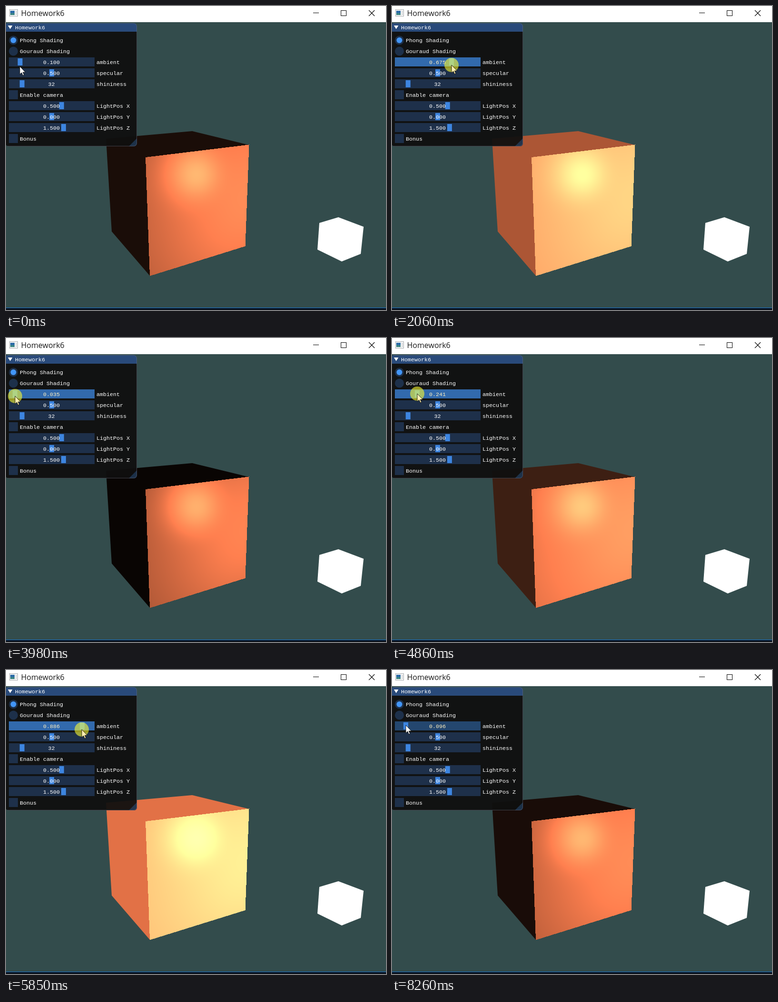
Animation of 798 by 639 pixels, one loop 9.11 s. Source, as an HTML page with a canvas:

```html
<!DOCTYPE html>
<html lang="en">
<head>
<meta charset="utf-8">
<title>Homework6</title>
<style>
  html, body { margin: 0; width: 100%; height: 100%; overflow: hidden; background: #334c4c; }
  canvas, svg { position: absolute; left: 0; top: 0; width: 798px; height: 639px; display: block; }
  .ui { font: 11.667px "Liberation Mono", monospace; fill: #fff; white-space: pre; }
  .title { font: 16px "Open Sans", sans-serif; fill: #1a1a1a; }
</style>
</head>
<body>
<canvas id="scene" width="798" height="639"></canvas>
<svg viewBox="0 0 798 639" width="798" height="639">
  <rect width="798" height="34" fill="#fff"/>
  <g shape-rendering="crispEdges">
    <rect x="7.5" y="7.5" width="17" height="14" fill="#f6f6f6" stroke="#a9adb0"/>
    <rect x="9" y="10" width="9" height="9" fill="#2d6ca8"/>
    <rect x="9" y="15" width="9" height="4" fill="#3c8583"/>
    <path d="M20 11.5h3M20 14.5h3M20 17.5h3" stroke="#b4b8bc"/>
  </g>
  <text class="title" x="31.5" y="21">Homework6</text>
  <g fill="none" stroke="#000">
    <path d="M645 14.5h12M703.5 9.5h11v11h-11z" shape-rendering="crispEdges"/>
    <path d="M762 9l12 12M774 9l-12 12" stroke-width="1.2"/>
  </g>
  <rect y="634" width="798" height="5" fill="#0b1420"/>
  <rect y="634" width="798" height="1" fill="#1a78d0"/>

  <path d="M0 54H275V289a6 6 0 0 1-6 6H5a6 6 0 0 1-5-3z" fill="#0f0f0f" fill-opacity=".94"/>
  <path d="M0 38q1-2 5-2H268a7 7 0 0 1 7 7V54H0z" fill="#294a7a"/>
  <path d="M258 295L275 278V289a6 6 0 0 1-6 6z" fill="#4296fa" fill-opacity=".25"/>
  <path d="M3 36.5H268a6.5 6.5 0 0 1 6.5 6.5V288a6.5 6.5 0 0 1-6.5 6.5H3" fill="none" stroke="#6e6e80" stroke-opacity=".5"/>
  <path d="M4 41h9.5l-4.75 7.5z" fill="#fff"/>
  <g id="panel" class="ui"><text x="19" y="49">Homework6</text></g>

  <circle id="press" r="15" fill="#ffff30" fill-opacity=".58"/>
  <path id="cursor" d="M0 0V16.5L3.8 13 6.4 19 8.9 18 6.4 12.2H11.6z" stroke="#000" stroke-width=".8"/>
</svg>
<script>
const LOOP = 9110, PRESS = 440, RELEASE = 8260, HOVER = 150;
const $ = id => document.getElementById(id);

// ---- settings panel ----
function add(tag, attrs, text) {
  const el = document.createElementNS('http://www.w3.org/2000/svg', tag);
  for (const k in attrs) el.setAttribute(k, attrs[k]);
  if (text) el.textContent = text;
  return $('panel').appendChild(el);
}
const FRAME = { fill: '#294a7a', 'fill-opacity': .54 };
const label = (x, row, text) => add('text', { x, y: row + 4 }, text);
const grabX = v => 13 + 166 * v;

function radio(row, text, on) {
  add('circle', { cx: 15.5, cy: row, r: 9.5, ...FRAME });
  if (on) add('circle', { cx: 15.5, cy: row, r: 6, fill: '#4296fa' });
  label(29, row, text);
}
function checkbox(row, text) {
  add('rect', { x: 6, y: row - 10, width: 19, height: 19, ...FRAME });
  label(29, row, text);
}
function slider(row, text, value, pos) {
  const bar = add('rect', { x: 6, y: row - 10, width: 180, height: 19, ...FRAME });
  const grab = add('rect', { x: grabX(pos) - 5, y: row - 8, width: 10, height: 15, fill: '#3d85e0' });
  const num = label(95.5, row, value);
  num.setAttribute('text-anchor', 'middle');
  label(190, row, text);
  return { bar, grab, num };
}

radio(72, 'Phong Shading', true);
radio(95, 'Gouraud Shading');
const ambient = slider(118, 'ambient', '0.100', .1);
slider(141, 'specular', '0.500', .5);
slider(164, 'shininess', '32', .125);
checkbox(187, 'Enable camera');
slider(210, 'LightPos X', '0.500', .625);
slider(233, 'LightPos Y', '0.000', .5);
slider(256, 'LightPos Z', '1.500', .65);
checkbox(279, 'Bonus');

// ---- Phong-lit cube ----
const ctx = $('scene').getContext('2d');
const BOX = { x: 292, y: 291, w: 220, h: 278 };
const CUBE = [[210, 279], [391, 263], [510, 292], [502, 505], [302, 567], [222, 474]];
const LAMP = [[698, 444], [751, 464], [745, 521], [705, 537], [654, 512], [658, 456]];
const light = [.5, 0, 1.5], eye = [-1.38, 1.02, 2.78];
const unit = v => { const n = Math.hypot(...v); return v.map(c => c / n); };
const toward = (p, q) => unit(q.map((c, i) => c - p[i]));

// Diffuse plus specular light at a point of the front face.
function lit(x, y) {
  const p = [x, y, .5], l = toward(p, light), v = toward(p, eye);
  const spec = Math.max(0, -l[0] * v[0] - l[1] * v[1] + l[2] * v[2]);
  return l[2] + .5 * spec ** 32;
}

// Perspective mapping from the unit square to the face on screen, inverted per pixel.
function faceLight() {
  const [x0, y0, x1, y1, x2, y2, x3, y3] = [293, 318, 510.5, 291.5, 502.5, 505, 302, 567.5];
  const ax = x1 - x2, ay = y1 - y2, bx = x3 - x2, by = y3 - y2;
  const sx = x0 - x1 + x2 - x3, sy = y0 - y1 + y2 - y3, den = ax * by - bx * ay;
  const g = (sx * by - bx * sy) / den, h = (ax * sy - sx * ay) / den;
  const a = x1 - x0 + g * x1, b = x3 - x0 + h * x3;
  const d = y1 - y0 + g * y1, e = y3 - y0 + h * y3;
  const out = new Float32Array(BOX.w * BOX.h);
  for (let i = 0; i < out.length; i++) {
    const X = BOX.x + i % BOX.w + .5, Y = BOX.y + Math.floor(i / BOX.w) + .5;
    const m = a - g * X, n = b - h * X, o = d - g * Y, q = e - h * Y;
    const det = m * q - n * o;
    const u = ((X - x0) * q - n * (Y - y0)) / det, v = (m * (Y - y0) - o * (X - x0)) / det;
    out[i] = u >= 0 && u <= 1 && v >= 0 && v <= 1 ? lit(u - .5, .5 - v) : -1;
  }
  return out;
}
const glow = faceLight(), image = ctx.createImageData(BOX.w, BOX.h);

function polygon(points, fill) {
  ctx.fillStyle = fill;
  ctx.beginPath();
  points.forEach(p => ctx.lineTo(...p));
  ctx.fill();
}
function drawScene(amb) {
  ctx.clearRect(0, 0, 798, 639);
  const px = image.data;
  glow.forEach((s, i) => {
    if (s < 0) return;
    const k = 255 * (s + amb), j = 4 * i;
    px[j] = k; px[j + 1] = k * .5; px[j + 2] = k * .31; px[j + 3] = 255;
  });
  ctx.putImageData(image, BOX.x, BOX.y);
  ctx.globalCompositeOperation = 'destination-over';
  polygon(CUBE, `rgb(${255 * amb},${127.5 * amb},${79 * amb})`);
  polygon(LAMP, '#fff');
  ctx.globalCompositeOperation = 'source-over';
}

// ---- pointer motion: bursts of steps, keys are [step, x, y, grab x if it lags] ----
const START = [0, 29, 127, 29.6];
const BURSTS = [
  { at: 70, gap: 80, keys: [[3, 29, 119, 29.6]] },
  { at: 830, gap: 77.3, keys: [[3, 38, 115], [8, 69, 121], [12, 125, 124]] },
  { at: 2670, gap: 76.7, keys: [[6, 113, 124], [10, 53, 122]] },
  { at: 3510, gap: 72, keys: [[8, 14, 122], [11, 17, 122]] },
  { at: 4610, gap: 79, keys: [[4, 53, 117], [9, 142, 126], [12, 176, 126]] },
  { at: 5540, gap: 80, keys: [[1, 177, 126]] },
  { at: 5850, gap: 78, keys: [[8, 35, 115, 41], [10, 18, 115], [11, 29, 116]] }
];
function pointer(t) {
  let pos = START;
  for (const { at, gap, keys } of BURSTS) {
    if (t < at) break;
    const step = Math.floor((t - at + 12) / gap) + 1;
    let from = [0, ...pos.slice(1)];
    for (const key of keys) {
      const to = [key[0], key[1], key[2], key[3] ?? key[1]];
      const f = Math.min(1, (step - from[0]) / (to[0] - from[0]));
      pos = from.map((c, i) => c + (to[i] - c) * f);
      if (step <= to[0]) break;
      from = to;
    }
  }
  return { x: pos[1], y: pos[2], value: Math.min(1, Math.max(0, (pos[3] - 13) / 166)) };
}

let shown = -1;
function render(t) {
  const { x, y, value } = pointer(t);
  const down = t >= PRESS && t < RELEASE, over = t >= HOVER;
  const place = `translate(${Math.round(x)} ${Math.round(y)})`;
  $('cursor').setAttribute('transform', place);
  $('cursor').setAttribute('fill', down ? '#fff0b0' : '#fff');
  $('press').setAttribute('transform', place);
  $('press').setAttribute('visibility', down ? 'visible' : 'hidden');
  ambient.bar.setAttribute('fill', over ? '#4296fa' : '#294a7a');
  ambient.bar.setAttribute('fill-opacity', down ? .67 : over ? .4 : .54);
  ambient.grab.setAttribute('fill', down ? '#4296fa' : '#3d85e0');
  ambient.num.setAttribute('fill', t >= PRESS ? '#fff0c0' : '#fff');
  if (value === shown) return;
  shown = value;
  ambient.grab.setAttribute('x', grabX(value) - 5);
  ambient.num.textContent = value.toFixed(3);
  drawScene(value);
}

const begin = performance.now();
function tick() {
  render((performance.now() - begin) % LOOP);
  requestAnimationFrame(tick);
}
tick();
</script>
</body>
</html>
```
